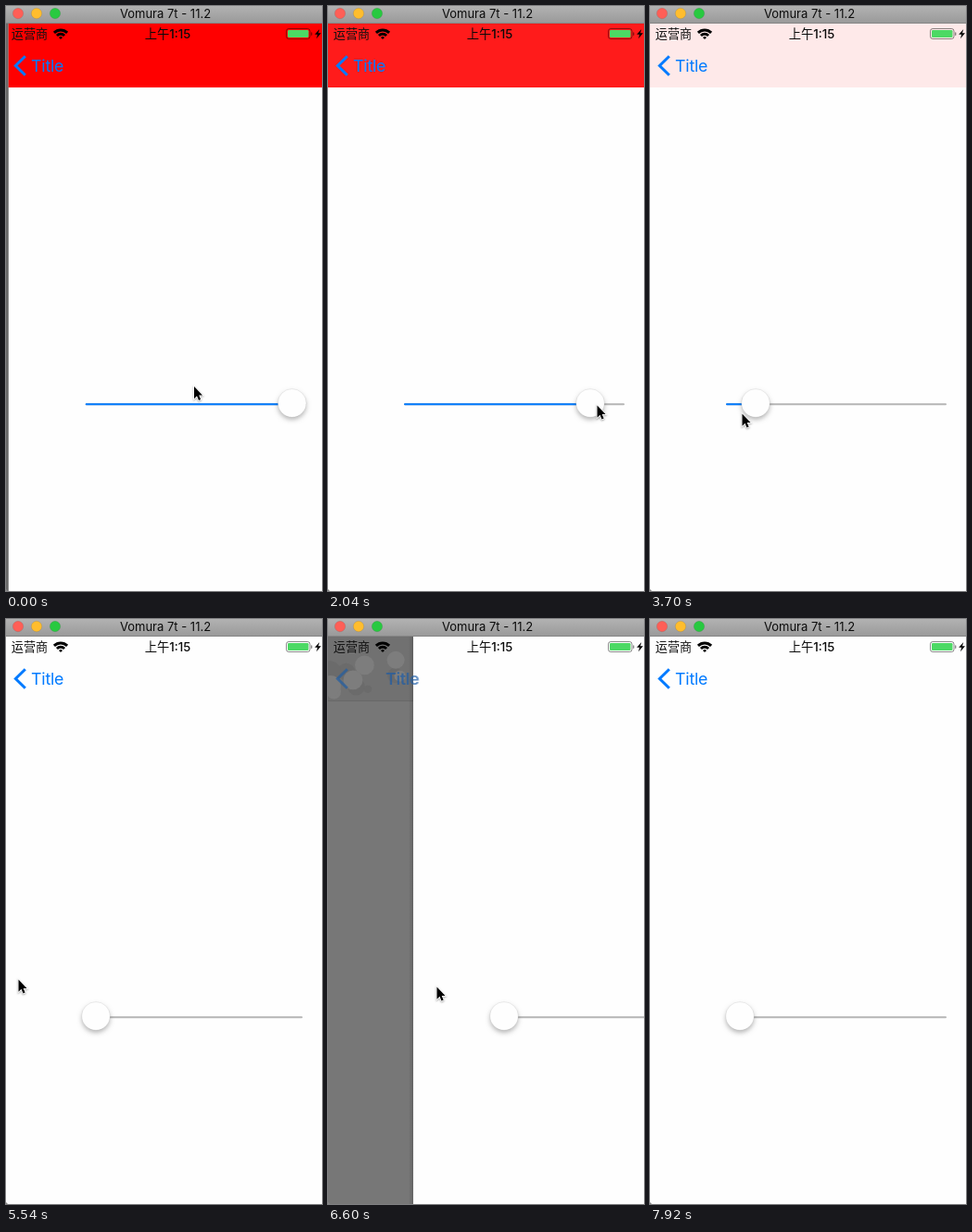
An HTML page with a canvas for the animation above (8000 ms loop, 341 px wide and 632 px high).

```html
<!DOCTYPE html>
<html lang="zh">
<head>
<meta charset="utf-8">
<title>Slider and navigation bar</title>
<style>
  html, body { margin: 0; width: 100%; height: 100%; overflow: hidden; background: #fff; }
  canvas { display: block; width: 100vw; height: 100vh; }
</style>
</head>
<body>
<canvas id="stage"></canvas>
<script>
const W = 341, H = 632, LOOP = 8000, STEP = 87.95;
const BAR_TOP = 19, BAR_BOTTOM = 88;
const TRACK_L = 82, TRACK_R = 320, TRACK_Y = 430.3;
const THUMB_MIN = 97, THUMB_MAX = 305, THUMB_Y = 429, THUMB_R = 15.3;
const SWIPE_START = 62, SWIPE_GRIP = 24.5;
const BLUE = '#007aff', MUTED_BLUE = '#1a5ca8';
const SANS = 'Inter, "Noto Sans CJK SC", "Noto Sans CJK", sans-serif';

const canvas = document.getElementById('stage');
const ctx = canvas.getContext('2d');
const dpr = window.devicePixelRatio || 1;
canvas.width = W * dpr;
canvas.height = H * dpr;

// Pointer waypoints: step, x, y. Equal neighbours are rests.
const pointer = [
  [0, 203, 411], [8, 274.5, 435.5], [11, 274.5, 435.5],
  [17, 311, 433], [21, 311, 433],
  [23, 290.5, 431.5], [34, 134.5, 438.5], [42, 99.5, 440.5], [48, 80, 441.5], [52, 80, 441.5],
  [59, 13.5, 389.5], [63, 13.5, 389.5],
  [75, 117.5, 397.5], [79, 153, 400], [84, 153, 400], [89, -20, 402]
];
const slide = [[21, THUMB_MAX], [23, 283], [34, 153], [42, 114], [48, THUMB_MIN]];

// Monotone cubic through one column of the waypoints: smooth, no overshoot.
function sample(keys, t, col = 1) {
  const last = keys.length - 1;
  const next = keys.findIndex(key => key[0] > t);
  if (next === 0) return keys[0][col];
  if (next < 0) return keys[last][col];
  const slope = i => (keys[i + 1][col] - keys[i][col]) / (keys[i + 1][0] - keys[i][0]);
  const tangent = i => {
    if (i === 0 || i === last) return 0;
    const a = slope(i - 1), b = slope(i);
    return a * b <= 0 ? 0 : 2 * a * b / (a + b);
  };
  const i = next - 1, span = keys[next][0] - keys[i][0];
  const u = (t - keys[i][0]) / span, ease = u * u * (3 - 2 * u);
  return keys[i][col] + (keys[next][col] - keys[i][col]) * ease
    + span * u * (1 - u) * ((1 - u) * tangent(i) - u * tangent(next));
}

// A released page settles first; later the pointer drags it from the left edge.
function pageOffset(step, pointerX) {
  if (step < SWIPE_START) return Math.max(0, 3.7 - 2.7 * step);
  return Math.max(0, pointerX - SWIPE_GRIP);
}

function seeded(seed) {
  return () => (seed = seed * 16807 % 2147483647) / 2147483647;
}

function rect(x, y, w, h, fill) {
  ctx.fillStyle = fill;
  ctx.fillRect(x, y, w, h);
}

function path(points, closed) {
  ctx.beginPath();
  points.forEach(([x, y]) => ctx.lineTo(x, y));
  if (closed) ctx.closePath();
}

function fillPath(points, fill) {
  path(points, true);
  ctx.fillStyle = fill;
  ctx.fill();
}

function pill(x, y, w, h, r, fill) {
  ctx.beginPath();
  ctx.roundRect(x, y, w, h, r);
  ctx.fillStyle = fill;
  ctx.fill();
}

function disc(x, y, r, fill) {
  ctx.beginPath();
  ctx.arc(x, y, r, 0, Math.PI * 2);
  ctx.fillStyle = fill;
  ctx.fill();
}

function outline(color, width) {
  ctx.strokeStyle = color;
  ctx.lineWidth = width;
  ctx.stroke();
}

function shadow(alpha, blur, dy) {
  ctx.shadowColor = `rgba(0,0,0,${alpha})`;
  ctx.shadowBlur = blur * dpr;
  ctx.shadowOffsetY = dy * dpr;
}

function gradient(x0, y0, x1, y1, from, to) {
  const g = ctx.createLinearGradient(x0, y0, x1, y1);
  g.addColorStop(0, from);
  g.addColorStop(1, to);
  return g;
}

function text(str, x, y, font, color, align = 'left', spacing = 0) {
  ctx.font = `${font} ${SANS}`;
  ctx.fillStyle = color;
  ctx.textAlign = align;
  ctx.letterSpacing = spacing + 'px';
  ctx.fillText(str, x, y);
}

function drawWindowBar() {
  rect(0, 0, W, 18, gradient(0, 0, 0, 18, '#b2b2b2', '#9a9a9a'));
  rect(0, 18, W, 1, '#858585');
  ['#ff5f57', '#ffbd2e', '#28c940'].forEach((color, i) => {
    disc(13 + i * 20, 8, 5.7, color);
    outline('rgba(0,0,0,.13)', 0.7);
  });
  text('Vomura 7t - 11.2', 172, 13, '13px', '#0c0c0c', 'center');
}

// Dimmed previous screen with a faint mottled picture behind its bar.
function drawPrevious(edge) {
  rect(0, BAR_TOP, edge, H - BAR_TOP, '#777');
  if (edge > 4) {
    const random = seeded(11);
    ctx.save();
    ctx.beginPath();
    ctx.rect(0, BAR_TOP, edge, BAR_BOTTOM - BAR_TOP);
    ctx.clip();
    rect(0, BAR_TOP, edge, BAR_BOTTOM - BAR_TOP, '#717171');
    for (let i = 0; i < 16; i++) {
      const x = random() * 140, y = 40 + random() * 45;
      disc(x, y, 4 + random() * 9, i % 2 ? '#7d7d7d' : '#6b6b6b');
    }
    rect(0, BAR_BOTTOM, edge, 1, '#656565');
    ctx.restore();
    rect(0, BAR_BOTTOM, edge, 1, '#686868');
  }
  rect(edge - 5, BAR_TOP, 5, H - BAR_TOP,
    gradient(edge - 5, 0, edge, 0, 'rgba(0,0,0,0)', 'rgba(0,0,0,.16)'));
}

// The back label slides toward the centre and becomes the bold title.
function drawNavItems(off) {
  const p = off > 4 ? off / 320 : 0;
  const color = p ? MUTED_BLUE : BLUE;
  const x = 27 + 122 * p;
  ctx.save();
  ctx.globalAlpha = 1 - 1.2 * p;
  path([[20.8, 54.3], [10.4, 64.5], [20.8, 74.7]]);
  outline(color, 3);
  ctx.globalAlpha = 1 - 2 * p;
  text('Title', x, 71, '17.8px', color, 'left', -0.2);
  ctx.globalAlpha = 1.7 * p;
  text('Title', x - 0.5, 71, '600 17.8px', color, 'left', -0.2);
  ctx.restore();
}

function drawWifi() {
  const from = -Math.PI * 0.75, to = -Math.PI * 0.25;
  ctx.fillStyle = '#000';
  for (let i = 0; i < 3; i++) {
    const inner = i * 4.3;
    ctx.beginPath();
    ctx.arc(59, 36, inner + 2.9, from, to);
    ctx.arc(59, 36, inner, to, from, true);
    ctx.fill();
  }
}

function drawBattery() {
  ctx.beginPath();
  ctx.roundRect(302.5, 24.5, 25.5, 11, 2.6);
  outline('rgba(0,0,0,.45)', 1);
  pill(304, 26, 22.5, 8, 1.2, '#4cd964');
  pill(329, 28.2, 1.4, 3.8, 0.7, 'rgba(0,0,0,.45)');
  fillPath([[338.3, 25], [333.2, 30.8], [336.2, 30.8], [335, 35.2], [340, 29.2], [337, 29.2]], '#000');
}

function drawStatus() {
  text('运营商', 5.8, 34.8, '13.1px', '#111');
  drawWifi();
  text('上午1:15', 174.5, 34.8, '500 13.3px', '#0a0a0a', 'center');
  drawBattery();
}

function drawSlider(off, thumb) {
  const x = off + thumb;
  pill(off + TRACK_L, TRACK_Y - 1, TRACK_R - TRACK_L, 2, 1, '#b5b5b5');
  pill(off + TRACK_L, TRACK_Y - 1, thumb - TRACK_L, 2, 1, BLUE);
  ctx.save();
  shadow(0.27, 5, 2.8);
  disc(x, THUMB_Y, THUMB_R, '#fefefe');
  ctx.restore();
  outline('rgba(0,0,0,.12)', 0.6);
}

function drawPointer(x, y) {
  ctx.save();
  ctx.beginPath();
  ctx.rect(0, BAR_TOP, W, H - BAR_TOP);
  ctx.clip();
  ctx.translate(x, y);
  ctx.scale(0.94, 0.94);
  path([[0, 0], [0, 14], [3.2, 11], [5.3, 15.9], [7.6, 14.9], [5.5, 10.1], [9.6, 10.1]], true);
  shadow(0.35, 2, 1);
  outline('#fff', 1.8);
  ctx.shadowColor = 'transparent';
  ctx.fillStyle = '#000';
  ctx.fill();
  ctx.restore();
}

function draw(ms) {
  const step = Math.floor((ms + 10) / STEP);
  const x = sample(pointer, step), y = sample(pointer, step, 2);
  const thumb = sample(slide, step);
  const value = (thumb - THUMB_MIN) / (THUMB_MAX - THUMB_MIN);
  const off = pageOffset(step, x);
  const edge = Math.max(0, off - 1);

  ctx.setTransform(dpr, 0, 0, dpr, 0, 0);
  rect(0, 0, W, H, '#fefefe');
  if (edge > 0) drawPrevious(edge);
  rect(edge, BAR_TOP, W - edge, BAR_BOTTOM - BAR_TOP, `rgba(255,0,0,${value})`);
  drawNavItems(off);
  drawStatus();
  drawSlider(off, thumb);
  fillPath([[0, H - 2], [2, H], [0, H]], '#888');
  drawWindowBar();
  drawPointer(x, y);
}

const start = performance.now();
function tick() {
  draw((performance.now() - start) % LOOP);
  requestAnimationFrame(tick);
}
tick();
</script>
</body>
</html>
```
